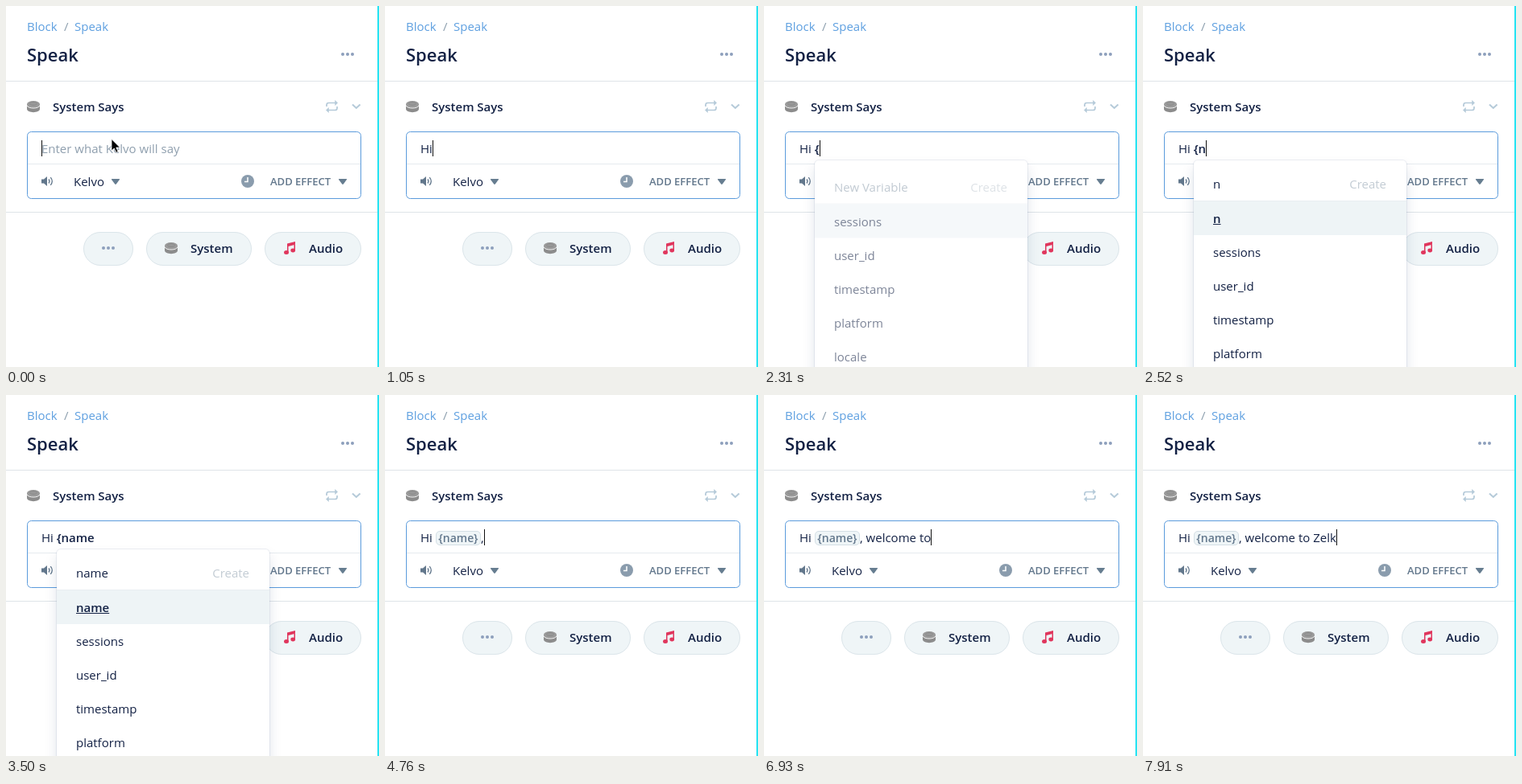
These frames come from a looping animation (463 by 449 pixels, 8000 ms). An HTML page:

```html
<!DOCTYPE html>
<html lang="en">
<head>
<meta charset="utf-8">
<title>Speak block</title>
<style>
  html, body { margin: 0; width: 100%; height: 100%; overflow: hidden; background: #fff; }
  body { position: relative; font: 15px "Open Sans", sans-serif; color: #132144; }
  svg, #editor, #menu { position: absolute; }
  svg { left: 0; top: 0; }
  text { fill: #132144; }
  .semi, b { font-weight: 600; }
  #editor { left: 44px; top: 167px; line-height: 20px; white-space: pre; }
  #caret { position: absolute; top: 0; width: 1px; height: 20px; background: #111; }
  .hint { color: #8f9fae; }
  .chip { display: inline-block; box-sizing: border-box; height: 18px; padding: 0 2.6px;
    font-size: 14px; line-height: 16px; color: #62778c; background: #eff5f7;
    border: 1px solid #d4dfe5; border-radius: 5px; }
  #menu { left: 63px; top: 192px; width: 264px; height: 300px; background: #fff; border-radius: 5px;
    overflow: hidden; box-shadow: 0 0 0 1px rgba(17,49,96,.07), 0 8px 16px rgba(17,49,96,.13); }
  #head { display: flex; justify-content: space-between; height: 50px; line-height: 59px;
    padding: 0 25px 0 24px; border-bottom: 1px solid #e8eef1; }
  #head span + span { color: #c3ccd4; }
  #rows div { height: 42px; line-height: 42px; padding-left: 24px; }
  #rows div:first-child { background: #eef4f6; }
  #rows b { text-decoration: underline; }
</style>
</head>
<body>
<svg width="463" height="449" fill="none">
  <defs>
    <g id="dots" fill="#8d9fbc"><circle cx="-6" r="2"/><circle r="2"/><circle cx="6" r="2"/></g>
    <path id="down" d="M-4.5-3.5h9q1 0 .4.9L.8 3q-.8.9-1.6 0L-4.9-2.6q-.6-.9.4-.9z" fill="#667d90"/>
    <g id="puck">
      <path d="M-8-2.5v5.5c0 5.5 16 5.5 16 0v-5.500z" fill="#8c8c8c"/>
      <ellipse cy="-2.800" rx="8" ry="4.200" fill="#9a9a9a"/>
      <path d="M-8-1.500c1 4.700 15 4.700 16 0" stroke="#fff" stroke-width=".9"/>
      <ellipse cy="-3.500" rx="4.500" ry="1.800" stroke="#858585" stroke-width=".8"/>
    </g>
  </defs>

  <g font-size="15">
    <text x="26" y="31" style="fill:#5d9fe0">Block</text>
    <text x="72" y="31" style="fill:#8d9fae">/</text>
    <text x="85" y="31" style="fill:#5d9fe0">Speak</text>
    <text x="26" y="69" class="semi" font-size="22">Speak</text>
    <text x="58" y="130.500" class="semi">System Says</text>
    <text x="84" y="223.500">Kelvo</text>
    <text x="328" y="222.700" class="semi" font-size="13" style="fill:#62778c">ADD EFFECT</text>
  </g>
  <use href="#dots" x="424" y="60"/>
  <path d="M0 93.500h461M0 256.500h461" stroke="#dfe4e8"/>
  <use href="#puck" x="34" y="125"/>

  <g stroke="#b5cad9" stroke-width="1.700">
    <path d="M398 125v-2q0-2.500 2.500-2.500h9M411 125v2q0 2.500-2.500 2.500h-9"/>
    <path d="M408.500 117.500l3.200 3-3.200 3zM400.500 126.500l-3.200 3 3.200 3z" fill="#b5cad9" stroke-width=".5"/>
    <path d="M430 122.500l4.800 4.500 4.800-4.500" stroke-width="2"/>
  </g>

  <rect x="26.500" y="156.500" width="414" height="83" rx="5" stroke="#5b9bdc"/>
  <path d="M27 196.500h413" stroke="#e6ebef"/>
  <path d="M44 215.500h3l4-3.500v12l-4-3.500h-3z" fill="#62778c"/>
  <path d="M53 215.500q2 2.500 0 5M55.300 213.200q4 4.800 0 9.600" stroke="#62778c" stroke-width="1.300"/>
  <use href="#down" x="136" y="218.500"/>
  <use href="#down" x="418" y="218.500"/>
  <circle cx="300" cy="218" r="8" fill="#8a9cad"/>
  <path d="M300 213v5.500h-4" stroke="#fff" stroke-width="1.500"/>

  <g fill="#eff5f7" stroke="#dbe5ea">
    <rect x="96.500" y="281.500" width="61" height="41" rx="20.500"/>
    <rect x="174.500" y="281.500" width="130" height="41" rx="20.500"/>
    <rect x="321.500" y="281.500" width="119" height="41" rx="20.500"/>
  </g>
  <use href="#dots" x="127" y="301"/>
  <use href="#puck" x="205" y="301"/>
  <g class="semi" font-size="15">
    <text x="229" y="306.500">System</text>
    <text x="376" y="306.500">Audio</text>
  </g>
  <g fill="#e0365d">
    <path d="M349 295.500l10-2.500v3.700l-8.500 2.200v7.300H349zM357.500 295H359v9h-1.500z"/>
    <ellipse cx="348" cy="306.500" rx="3" ry="2.500"/>
    <ellipse cx="356.200" cy="304" rx="2.900" ry="2.400"/>
  </g>
  <path d="M462 0v449" stroke="#25e3f2" stroke-width="2"/>
</svg>

<div id="editor"><span id="typed"></span><span id="caret"></span><span id="hint" class="hint">Enter what Kelvo will say</span></div>

<div id="menu"><div id="content">
  <div id="head"><span id="query"></span><span>Create</span></div>
  <div id="rows"></div>
</div></div>

<svg id="pointer" width="463" height="200">
  <path d="M131 165.500v14.500l3.300-3 2.400 5.300 2.500-1.100-2.400-5.200h4.700z" fill="#000" stroke="#fff" stroke-width=".8"/>
</svg>

<script>
const LOOP = 8000, TICK = 70, MENU_OPEN = 2170, MENU_FADE = 280;
const variables = ["sessions", "user_id", "timestamp", "platform", "locale"];

const keys = [
  [560, "H"], [1050, "i"], [1680, " "], [2100, "{"],
  [2450, "n"], [2590, "a"], [2660, "m"], [2940, "e"], [3640, "}"],
  [4340, ","], [4900, " "],
  [5600, "w"], [5740, "e"], [5810, "l"], [5950, "c"], [6090, "o"], [6230, "m"], [6440, "e"],
  [6580, " "], [6720, "t"], [6860, "o"], [7070, " "],
  [7350, "Z"], [7630, "e"], [7770, "l"], [7910, "k"]
];
const caretOff = [70, 1540, 3500, 4200, 5460];

const el = id => document.getElementById(id);
const show = (id, on) => { el(id).style.visibility = on ? "visible" : "hidden"; };
const bold = s => s.endsWith("}") ? `<b class="chip">${s}</b>` : `<b>${s}</b>`;
let lastText = null;

function setText(text, query) {
  if (text === lastText) return;
  lastText = text;
  el("typed").innerHTML = text.replace(/{\w*}?/, bold);
  el("hint").style.display = text ? "none" : "inline";
  el("query").textContent = query || "New Variable";
  el("query").className = query ? "" : "hint";
  el("rows").innerHTML = [...(query ? [bold(query)] : []), ...variables]
    .map(name => `<div>${name}</div>`).join("");
}

function draw(now) {
  const t = Math.floor(now % LOOP / TICK) * TICK;
  const pressed = keys.filter(([at]) => at <= t);
  const text = pressed.map(([, key]) => key).join("");
  const query = text.match(/{(\w*)$/)?.[1];
  const lastKey = pressed.length ? pressed[pressed.length - 1][0] : 0;

  setText(text, query);
  show("caret", !caretOff.some(at => at <= t && at > lastKey));
  show("pointer", t < 700);
  show("menu", query !== undefined && t >= MENU_OPEN);

  const p = Math.min(1, Math.max(0, (t - MENU_OPEN) / MENU_FADE));
  el("content").style.opacity = 0.1 + 0.9 * p;
  el("content").style.transform = `translateY(${7 * (1 - p)}px)`;
}

const start = performance.now();
(function frame() {
  draw(performance.now() - start);
  requestAnimationFrame(frame);
})();
</script>
</body>
</html>
```
